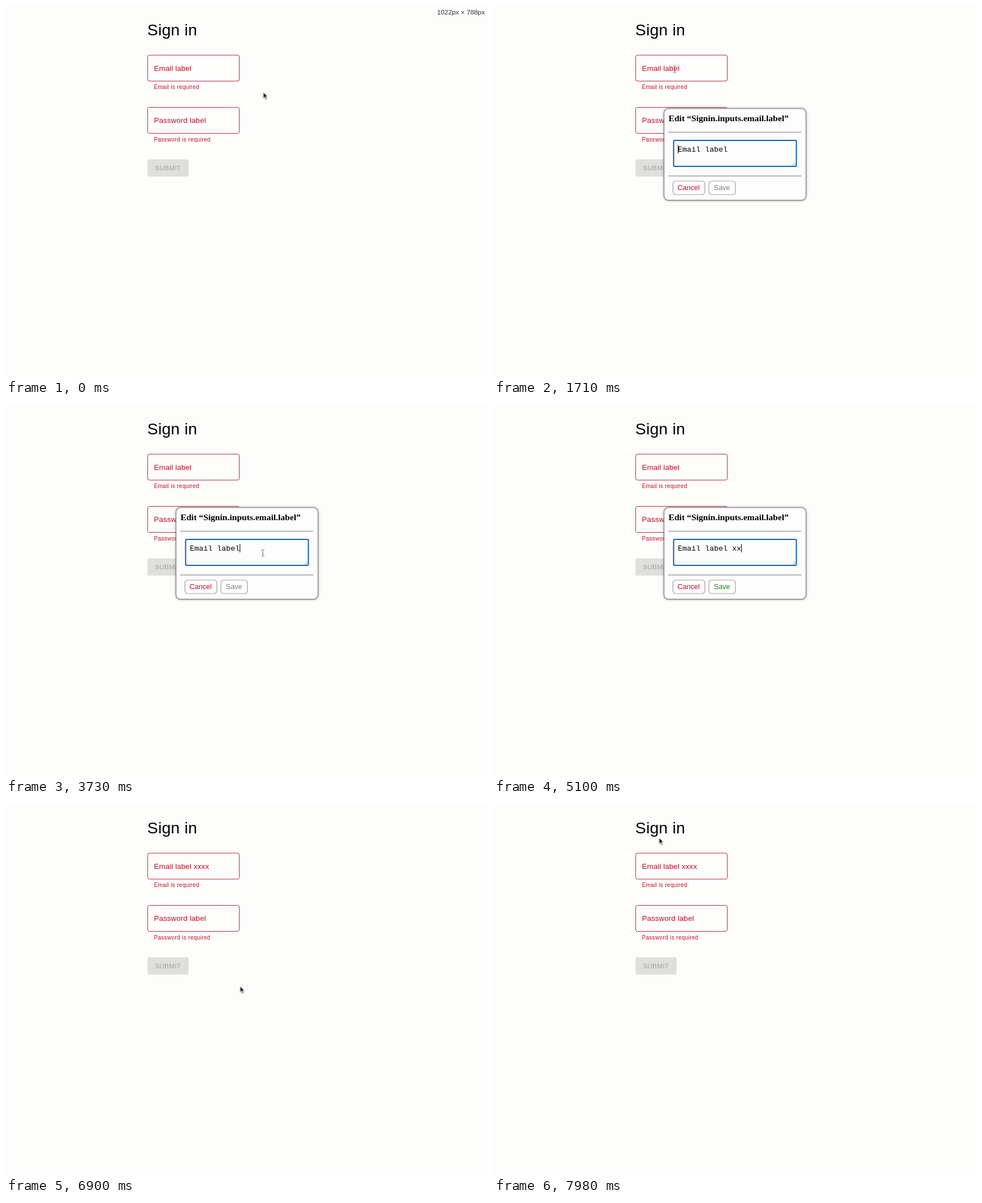
Animation of 852x657 px, one loop 8 s. Source, as an HTML page:

```html
<!DOCTYPE html>
<html lang="en">
<head>
<meta charset="utf-8">
<title>Inline label editing</title>
<style>
  html, body { margin: 0; width: 100%; height: 100%; overflow: hidden; background: #fdfdfb; }
  svg { display: block; width: 852px; height: 657px; font-family: "Liberation Sans", Arial, sans-serif; }
  text { white-space: pre; }
  .field { fill: none; stroke: #b3263c; }
  .label { font-size: 13.34px; letter-spacing: .125px; fill: #b8102c; }
  .help { font-size: 10px; letter-spacing: .333px; fill: #b8102c; }
  .button { fill: #fdfdfd; stroke: #a3a3a3; stroke-width: 1.2; }
  .action { font-size: 12.5px; }
</style>
</head>
<body>
<svg viewBox="0 0 852 657">
  <text id="size" x="762" y="15" font-size="11.8" fill="#333">1022px × 788px</text>
  <text x="249.8" y="52" font-size="28.34" letter-spacing=".21">Sign in</text>

  <rect class="field" x="250.4" y="87" width="162" height="46" rx="3.3"/>
  <text class="label" id="label" x="261.4" y="114.5"></text>
  <text class="help" x="261.4" y="147">Email is required</text>

  <rect class="field" x="250.4" y="179.6" width="162" height="46" rx="3.3"/>
  <text class="label" x="261.4" y="207">Password label</text>
  <text class="help" x="261.4" y="239.7">Password is required</text>

  <rect x="250" y="271.6" width="73" height="30.4" rx="3.3" fill="#dfdfdd"/>
  <text x="263.2" y="291" font-size="11.67" letter-spacing=".333" fill="#a3a3a2">SUBMIT</text>

  <g id="dialog">
    <rect x="300.5" y="181.6" width="251" height="162.4" rx="8" fill="#fdfdfd" stroke="#888"
      stroke-width="1.4" style="filter: drop-shadow(0 0 2px #0005)"/>
    <text x="308.5" y="204" font-size="15.6" font-weight="bold"
      font-family="Liberation Serif, Times, serif">Edit “Signin.inputs.email.label”</text>
    <path d="M308 223.5H543.5M308 301H543.5" stroke="#a0a0a0" stroke-width="1.3"/>
    <rect x="317.5" y="238" width="217" height="46" rx="2" fill="#fdfdfd" stroke="#1160ac" stroke-width="2"/>
    <path d="M527.5 282.5l5.5-5.5M530.7 282.5l2.3-2.3" stroke="#777" stroke-width=".8"/>
    <text id="entry" x="325" y="257.6" font-size="13.34"
      font-family="Liberation Mono, Courier, monospace"></text>
    <path id="caret" d="M325.5 246V261" stroke="#000"/>
    <rect class="button" x="316.3" y="310" width="56.4" height="24" rx="5"/>
    <text class="action" x="324.6" y="326" fill="#c00c28">Cancel</text>
    <rect class="button" x="379.8" y="310" width="46.8" height="24" rx="5"/>
    <text class="action" id="save" x="388.8" y="326">Save</text>
  </g>

  <g id="cursor">
    <path id="arrow" d="M0 0V10L2.3 8L4 12L5.7 11.3L4 7.4H7.2Z"
      fill="#111" stroke="#fff" stroke-width=".8" style="filter: drop-shadow(0 1px 1px #0006)"/>
    <path id="beam" d="M-2.8-6Q0-6 0-4.6Q0-6 2.8-6M0-4.6V4.6M-2.8 6Q0 6 0 4.6Q0 6 2.8 6M-1.3 2H1.3"
      fill="none" stroke="#666" stroke-width=".9"/>
    <path id="hand" d="M-1.4 7V.9Q-1.2-.6 0-.6T1.4.9V4.6Q3 3.4 3.9 4.9Q5.4 4 6.1 5.4Q8 5 8 7V9Q7.6 11 6.5 13H.4
      Q-1-1.5 -1.4 7ZM-1.4 7Q-4.5 4.6-4 7Q-2 9.4.4 13M2.3 8V10.5M4 8V10.5M5.7 8V10.5"
      fill="#fff" stroke="#444" stroke-width=".8"/>
  </g>
</svg>
<script>
const LOOP = 8000, OPEN = 1710, CLOSE = 6340, CLICK = 3640;
const TEXT = "Email label", TYPED = " xxxx", CHAR = 8.005;
const KEYS = [4560, 4940, 5100, 5280, 5450];
const START = [455, 153];
// start, end, control point, end point
const MOVES = [
  [670, 810, 390, 126, 327, 111],
  [810, 1140, 322, 112, 319, 112],
  [2580, 2730, 340, 130, 372, 140],
  [3060, 3700, 400, 225, 454, 262],
  [5670, 5920, 446, 300, 422, 324],
  [5920, 6340, 418, 325, 414, 323],
  [6900, 7270, 555, 180, 297.5, 109],
  [7610, 7980, 555, 235, 292, 60]
];

const $ = id => document.getElementById(id);
const show = (id, on) => $(id).style.display = on ? "" : "none";

function pointerAt(t) {
  let [x, y] = START;
  for (const [from, to, cx, cy, ex, ey] of MOVES) {
    if (t < from) break;
    const p = Math.min(1, (t - from) / (to - from));
    const u = p * p * (3 - 2 * p), v = 1 - u;
    x = v * v * x + 2 * u * v * cx + u * u * ex;
    y = v * v * y + 2 * u * v * cy + u * u * ey;
  }
  return [x, y];
}

function pointerKind(x, y, open) {
  const over = (l, t, r, b) => x >= l && x <= r && y >= t && y <= b;
  if (open && over(300, 181, 552, 344)) {
    if (over(317, 237, 535, 285)) return "beam";
    return over(316, 310, 373, 334) || over(379, 310, 427, 334) ? "hand" : "arrow";
  }
  return over(250, 87, 413, 133) || over(250, 180, 413, 226) ? "beam" : "arrow";
}

function draw(t) {
  const open = t >= OPEN && t < CLOSE;
  const count = KEYS.filter(k => t >= k).length;
  const entry = TEXT + TYPED.slice(0, count);
  show("size", t < 670);
  show("dialog", open);
  $("label").textContent = t < CLOSE ? TEXT : TEXT + TYPED;
  $("entry").textContent = entry;
  $("save").setAttribute("fill", count ? "#1c8a14" : "#808080");

  const touched = count ? KEYS[count - 1] : t < CLICK ? OPEN : CLICK;
  const place = t < CLICK ? 0 : entry.length;
  show("caret", Math.floor((t - touched) / 500) % 2 === 0);
  $("caret").setAttribute("transform", `translate(${place * CHAR})`);

  const [x, y] = pointerAt(t), kind = pointerKind(x, y, open);
  show("cursor", t < 4140 || t >= 5670);
  for (const id of ["arrow", "beam", "hand"]) show(id, id === kind);
  $("cursor").setAttribute("transform", `translate(${x} ${y})`);
}

const begin = performance.now();
function tick() {
  draw((performance.now() - begin) % LOOP);
  requestAnimationFrame(tick);
}
tick();
</script>
</body>
</html>
```
